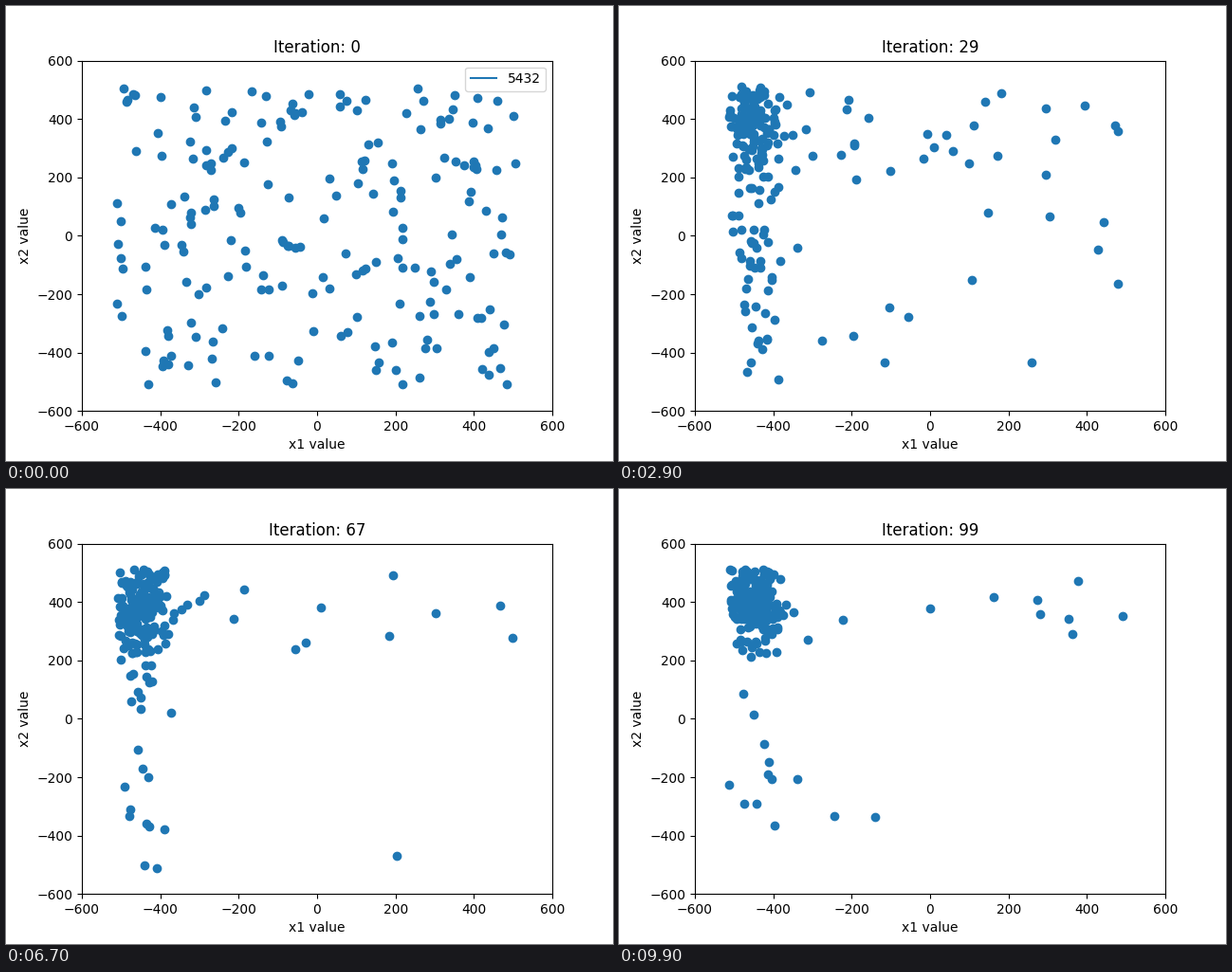
Recreate the animation shown at these times as a matplotlib script. Size 640 by 480 pixels, loop 10000 ms.

```python
import numpy as np
import matplotlib.pyplot as plt
from matplotlib.animation import FuncAnimation

ITERATIONS = 100
POPULATION = 200
LIMIT = 512
BEST = (-448, 380)
RENEWAL = 0.6  # share of the population replaced per iteration

rng = np.random.default_rng(5432)


def offspring(t, n):
    """Points near the optimum, with each coordinate straying independently."""
    stray_x = 0.05 + 0.48 * np.exp(-t / 30) + 0.47 * np.exp(-t / 4)
    stray_y = 0.10 + 0.90 * np.exp(-t / 25)
    x = rng.normal(BEST[0], 34 + 25 * np.exp(-t / 12), n)
    y = rng.normal(BEST[1], 78, n)
    far_x = -LIMIT + 2 * LIMIT * rng.random(n) ** 1.4
    far_y = rng.uniform(-LIMIT, LIMIT, n)
    x = np.where(rng.random(n) < stray_x, far_x, x)
    y = np.where(rng.random(n) < stray_y, far_y, y)
    # fold back whatever leaves the search space
    return np.column_stack([np.abs(x + LIMIT) - LIMIT,
                            LIMIT - np.abs(LIMIT - y)])


def evolve():
    points = rng.uniform(-LIMIT, LIMIT, (POPULATION, 2))
    history = [points]
    for t in range(1, ITERATIONS):
        renewed = rng.random(POPULATION) < RENEWAL
        points = np.where(renewed[:, None], offspring(t, POPULATION), points)
        history.append(points)
    return history


history = evolve()

fig, ax = plt.subplots(figsize=(6.4, 4.8), dpi=100)
ax.set(xlim=(-600, 600), ylim=(-600, 600),
       xlabel="x1 value", ylabel="x2 value")
dots = ax.scatter(*history[0].T, color="C0")
line, = ax.plot([], [], color="C0", label="5432")
legend = ax.legend(handles=[line], loc="upper right")
title = ax.set_title("Iteration: 0")


def update(t):
    dots.set_offsets(history[t])
    title.set_text(f"Iteration: {t}")
    legend.set_visible(t == 0)
    return dots, title, legend


anim = FuncAnimation(fig, update, frames=ITERATIONS, interval=100,
                     repeat=True, repeat_delay=0, blit=False)
plt.show()
```
